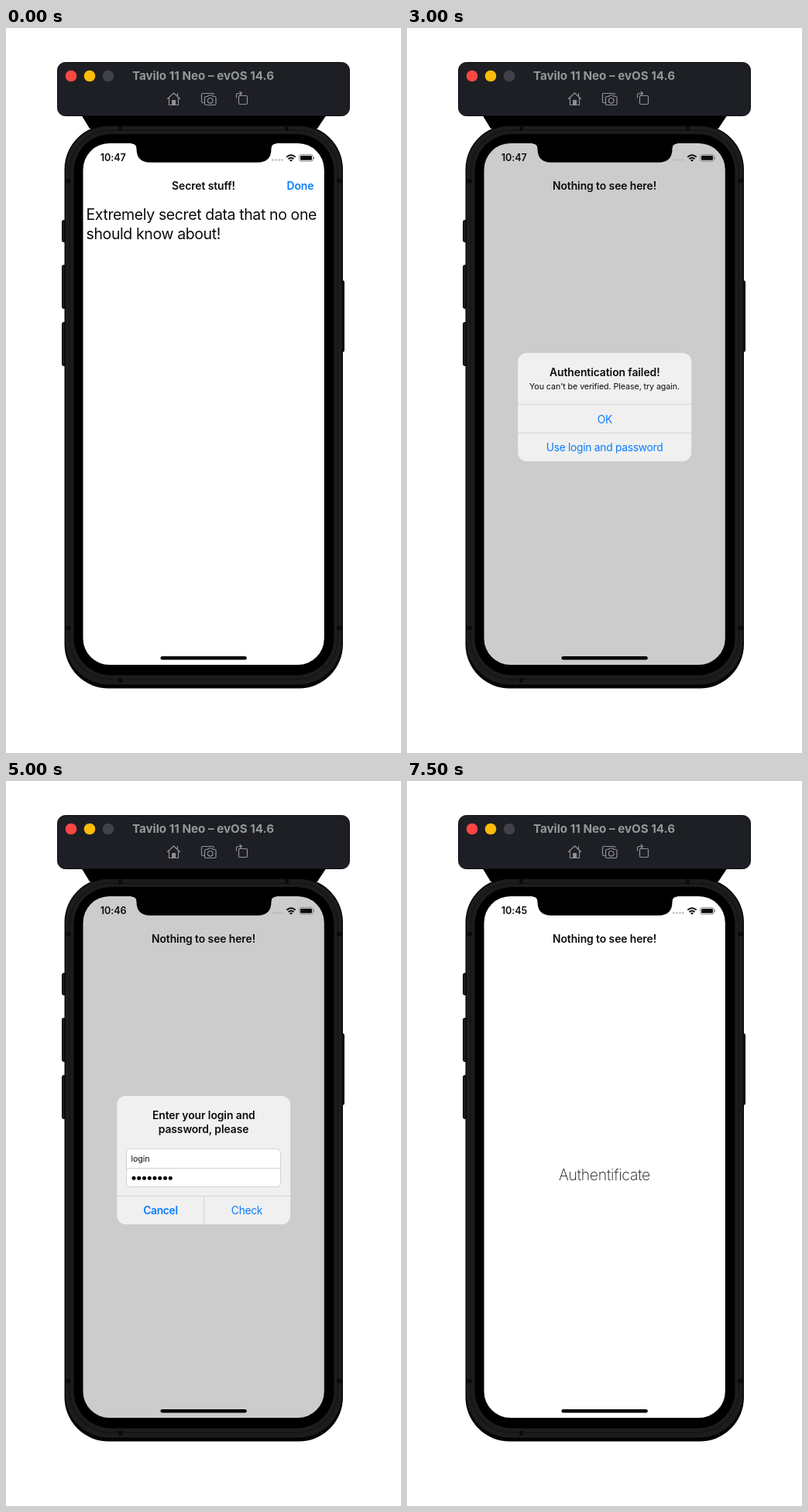
Animation, 510 px wide and 937 px high, one loop 8 s. Source, as an HTML page:

```html
<!DOCTYPE html>
<html lang="en">
<head>
<meta charset="utf-8">
<title>Secret note demo</title>
<style>
  html, body { margin: 0; width: 100%; height: 100%; overflow: hidden; background: #fff; }
  svg { display: block; width: 510px; height: 937px; font-family: Inter, Roboto, "Open Sans", sans-serif; }
  text { fill: #0c0c0d; }
  .mid { text-anchor: middle; }
  .head { font-size: 13.9px; font-weight: 600; letter-spacing: -.08px; }
  .btn { font-size: 13.8px; letter-spacing: -.28px; }
  .btn, .done { fill: #087dfc; }
  .bold { font-weight: 600; }
  .small { font-size: 10.7px; letter-spacing: -.08px; }
  .note { font-size: 19.5px; letter-spacing: -.38px; }
  .icon { fill: none; stroke: #909196; stroke-width: 1.2; stroke-linejoin: round; stroke-linecap: round; }
  .rule { stroke: #d3d3d4; stroke-width: 1; }
  .off { display: none; }
</style>
</head>
<body>
<svg viewBox="0 0 510 937">
  <!-- phone body -->
  <path d="M97 112H414L402 130H108Z" fill="#000"/>
  <g fill="#1b1b1c" stroke="#050505">
    <rect x="72.5" y="248.5" width="7" height="28" rx="2"/>
    <rect x="72.5" y="306.5" width="7" height="56" rx="2"/>
    <rect x="72.5" y="380.5" width="7" height="56" rx="2"/>
    <rect x="430" y="326.5" width="6.5" height="92" rx="2"/>
  </g>
  <rect x="75.5" y="125.5" width="359.5" height="728" rx="57" fill="#050505"/>
  <rect x="76.7" y="127" width="357" height="721.5" rx="56" fill="#1c1c1d"/>
  <rect x="82" y="132" width="346.5" height="710" rx="54" fill="none" stroke="#161617" stroke-width="2"/>
  <g fill="#0b0b0c">
    <path d="M77 195h7v5h-7zM427 195h7v5h-7zM77 773h7v5h-7zM427 773h7v5h-7z"/>
    <path d="M145 127h5v6h-5zM360 127h5v6h-5zM145 840h5v6h-5z"/>
  </g>
  <rect x="87.5" y="137" width="336" height="699.5" rx="48" fill="#000"/>
  <rect id="bg" x="99.5" y="149" width="311.3" height="674" rx="34" fill="#fff"/>
  <path d="M162 148H349V149.5Q342.5 149.5 342.5 156Q342.5 173.7 325 173.7H186Q168.500 173.7 168.5 156Q168.5 149.5 162 149.5Z" fill="#000"/>

  <!-- window bar -->
  <rect x="66.5" y="44.5" width="377" height="69" rx="10" fill="#1d1f25" stroke="#0c0d10"/>
  <circle cx="84" cy="62" r="7.3" fill="#fc4743"/>
  <circle cx="108" cy="62" r="7.3" fill="#fdbb0a"/>
  <circle cx="132" cy="62" r="7.3" fill="#404247"/>
  <text class="mid" x="254.5" y="67.3" style="font-size:15.2px;font-weight:700;fill:#96979b">Tavilo 11 Neo – evOS 14.6</text>
  <g class="icon">
    <path d="M208.5 91.5L216.5 84L224.5 91.5M210.5 90.5V99.5H222.5V90.5M221.5 88V84.5"/>
    <path d="M214.7 99V93.5H218.5V99Z" fill="#909196"/>
    <path d="M256 96.5H254Q252.5 96.5 252.5 95V86Q252.5 84.5 254 84.5H267Q268.5 84.5 268.5 86"/>
    <path d="M258 88.5H260.5L261.5 87H266L267 88.5H269.5Q271 88.5 271 90V98Q271 99.5 269.5 99.5H258Q256.5 99.5 256.5 98V90Q256.5 88.5 258 88.5Z"/>
    <circle cx="263.7" cy="93.8" r="3.3"/>
    <rect x="300.5" y="87.5" width="11" height="11" rx="1.5"/>
    <path d="M297.5 90V87Q297.5 84.5 300 84.5H304M302 82.2L304.5 84.5L302 86.8"/>
  </g>

  <!-- status bar -->
  <text id="clock" class="bold" x="121.8" y="172.3" style="font-size:12.6px;letter-spacing:-.1px"></text>
  <g fill="#b9b9bc">
    <circle cx="344.5" cy="170.5" r="1.3"/><circle cx="348.5" cy="170.5" r="1.3"/>
    <circle cx="352.5" cy="170.5" r="1.3"/><circle cx="356.3" cy="170.5" r="1.3"/>
  </g>
  <g fill="none" stroke="#0b0b0c" stroke-width="1.9">
    <path d="M362.3 166.8Q368 161.8 373.7 166.8"/>
    <path d="M364.5 169.2Q368 166.2 371.5 169.2"/>
  </g>
  <path d="M366 170.7Q368 169.2 370 170.7L368 172.8Z"/>
  <rect x="378.6" y="163.6" width="17.8" height="8.6" rx="2.5" fill="none" stroke="#8b8b8d"/>
  <rect x="380" y="165" width="15" height="5.8" rx="1.3" fill="#0b0b0c"/>
  <path d="M397.5 166.5v3" stroke="#8b8b8d" stroke-width="1.2"/>

  <g id="secret">
    <text class="head mid" x="255" y="208.5">Secret stuff!</text>
    <text class="head done" x="362.5" y="208.5">Done</text>
    <text id="line0" class="note" x="103.5" y="248.3"></text>
    <text id="line1" class="note" x="103.5" y="273.3"></text>
    <rect id="caret" width="1.6" height="26" rx=".8" fill="#5560e6"/>
  </g>

  <text id="title" class="head mid" x="255" y="208.5">Nothing to see here!</text>

  <text id="home" class="mid" x="255" y="516" style="font-size:19.4px;font-weight:200;letter-spacing:-.2px">Authentificate</text>

  <g id="face">
    <rect x="191" y="420" width="128.5" height="131.8" rx="7" fill="#dcdde1"/>
    <text class="head mid" x="255" y="532">Gaze OK</text>
  </g>

  <g id="failed">
    <rect x="143.2" y="420" width="224" height="140" rx="11.5" fill="#f0f0f0"/>
    <path class="rule" d="M143.2 486.5h224M143.2 523.5h224"/>
    <text class="head mid" x="255.3" y="450">Authentication failed!</text>
    <text class="small mid" x="255" y="466.5">You can't be verified. Please, try again.</text>
    <text class="btn mid" x="255.3" y="510.5">OK</text>
    <text class="btn mid" x="255" y="547">Use login and password</text>
  </g>

  <g id="login">
    <rect x="143.2" y="407" width="224" height="166" rx="11.5" fill="#f0f0f0"/>
    <text class="head mid" x="255.3" y="437.3">Enter your login and</text>
    <text class="head mid" x="255" y="455.3">password, please</text>
    <rect x="155.5" y="475.5" width="199" height="49" rx="5" fill="#fff" stroke="#d3d3d4"/>
    <path class="rule" d="M155.5 500.5h199M143.2 536.5h224M255.5 536.5v36.5"/>
    <text class="small" x="161.5" y="492.3">login</text>
    <g id="dots"></g>
    <text class="btn bold mid" x="199.5" y="560">Cancel</text>
    <text class="btn mid" x="311" y="560">Check</text>
  </g>

  <rect x="199.5" y="812" width="111.3" height="4.4" rx="2.2" fill="#000"/>
</svg>
<script>
  const STEP = 500;
  const LINES = ["Extremely secret data that no one", "should know about!"];
  const ALL = LINES.join("").length;
  const VIEWS = ["secret", "home", "face", "failed", "login"];
  const BACK = { secret: "#fff", home: "#fff", face: "#fcfcfc", failed: "#ccc", login: "#ccc" };

  // minute, view, typed characters, caret shown
  const STEPS = [
    [47, "secret", ALL, false],
    [47, "secret", ALL, true],
    [47, "secret", ALL - 4, true],
    [47, "secret", LINES[0].length, true],
    [47, "secret", 0, true],
    [47, "login", 8],
    [47, "failed"],
    [46, "face"],
    [46, "failed"],
    [46, "failed"],
    [46, "login", 8],
    [46, "login", 0],
    [45, "failed"],
    [45, "failed"],
    [45, "failed"],
    [45, "home"]
  ];

  const el = id => document.getElementById(id);
  const show = (id, on) => el(id).classList.toggle("off", !on);

  for (let i = 0; i < 8; i++) {
    const dot = document.createElementNS("http://www.w3.org/2000/svg", "circle");
    dot.setAttribute("cx", 165 + i * 6.75);
    dot.setAttribute("cy", 513.2);
    dot.setAttribute("r", 2.5);
    el("dots").append(dot);
  }

  function drawNote(count, caret) {
    const first = LINES[0].length;
    el("line0").textContent = LINES[0].slice(0, count);
    el("line1").textContent = LINES[1].slice(0, Math.max(0, count - first));
    const row = count > first ? 1 : 0;
    const width = count ? el("line" + row).getComputedTextLength() : 0;
    el("caret").setAttribute("x", 102.8 + width);
    el("caret").setAttribute("y", 228 + row * 25);
    show("caret", caret);
  }

  function draw([minute, view, count, caret]) {
    el("clock").textContent = "10:" + minute;
    el("bg").setAttribute("fill", BACK[view]);
    for (const v of VIEWS) show(v, v === view);
    show("title", view !== "secret");
    if (view === "secret") drawNote(count, caret);
    if (view === "login") [...el("dots").children].forEach((d, i) => d.classList.toggle("off", i >= count));
  }

  let last = -1;
  const start = performance.now();
  function tick(now) {
    const i = Math.floor(Math.max(0, now - start) / STEP) % STEPS.length;
    if (i !== last) draw(STEPS[last = i]);
    requestAnimationFrame(tick);
  }
  tick(start);
</script>
</body>
</html>
```
